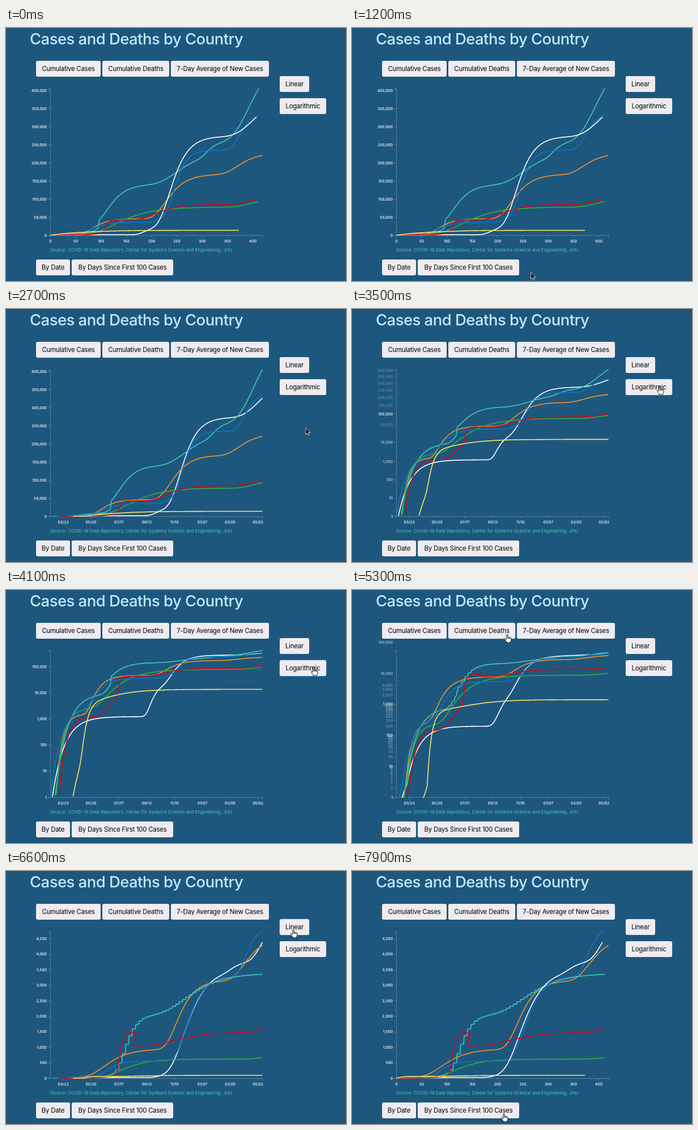
An HTML page that plays this animation: 600x447 px, repeating every 8000 ms.

```html
<!DOCTYPE html>
<html lang="en">
<head>
<meta charset="utf-8">
<title>Cases and Deaths by Country</title>
<style>
html, body { margin: 0; width: 100%; height: 100%; overflow: hidden; background: #1e577d; }
body { position: relative; font-family: Inter, Roboto, sans-serif; }
h1 { position: absolute; left: 42px; top: 2px; margin: 0; font-size: 27.5px; line-height: 34px;
  font-weight: 500; letter-spacing: -.02em; color: #c1e8ff; white-space: nowrap; }
.btn { position: absolute; height: 28px; border-radius: 3px; background: #eeecf0; color: #000;
  font-size: 11.4px; line-height: 28px; letter-spacing: -.02em; text-align: center; white-space: nowrap; }
.btn.on { box-shadow: 0 0 1.5px 1px #2f7fd0b0; }
svg { position: absolute; left: 0; top: 0; }
svg text { font-size: 6.6px; font-weight: 500; fill: #fff; }
#source { font-size: 7.91px; font-weight: 400; fill: #40c9b8; }
#lines path { fill: none; stroke-width: 1.6; stroke-linejoin: round; }
.axis { fill: none; stroke: #fff; stroke-opacity: .4; stroke-width: .6; }
#hand { fill: #fff; stroke: #000; stroke-width: .9; stroke-linejoin: round; }
#arrow { fill: #000; stroke: #fff; stroke-width: .8; }
</style>
</head>
<body>
<h1>Cases and Deaths by Country</h1>
<div id="buttons"></div>
<svg width="600" height="447" viewBox="0 0 600 447">
  <clipPath id="plot"><rect x="78" y="90" width="376" height="277"/></clipPath>
  <path class="axis" d="M74.5 107.5H78.5V366.5H74.5M78.5 366.5H452.5V370.5"/>
  <g id="yAxis" text-anchor="end"></g>
  <g id="xAxis" text-anchor="middle"></g>
  <g id="lines" clip-path="url(#plot)"></g>
  <text id="source" x="78" y="395">Source: COVID-19 Data Repository, Center for Systems Science and Engineering, JHU</text>
  <g id="cursor">
    <path id="arrow" d="M0 0V11.5L2.7 9L4.6 13.2L6.4 12.4L4.6 8.3H8.3Z"/>
    <path id="hand" d="M-1.1 .8Q-1-.3 0-.3T1.1 .8V4.6Q2.2 3.9 3.1 4.9Q4.3 4.4 5 5.4Q6.8 5 6.9 6.8V9.5Q6.5 11.5 5.6 12.5V14H-1V12.8Q-2.6 11-4.4 8.2Q-5 6.7-3.6 6.6Q-2.4 7-1.1 8.4ZM1.1 4.6V7M3.1 5V7.2M5 5.5V7.4"/>
  </g>
</svg>
<script>
const LOOP = 8000, EASE_MS = 400;
const LEFT = 78.5, RIGHT = 452.5, BASE = 366;
const DAYS = 442, DAY = 0.846, DAY_SINCE = 0.8925;
const $ = id => document.getElementById(id);
const mix = (a, b, p) => a + (b - a) * p;
const range = (n, f) => Array.from({ length: n }, (_, i) => f(i));

// Pixels per decade, units per pixel, and tick marks of each measure.
const SCALE = {
  cases: { decade: 46.2, unit: 1562.5, step: 50000, ticks: 9, powers: 6 },
  deaths: { decade: 70.5, unit: 18.25, step: 500, ticks: 10, powers: 4 }
};

// Each total is a sum of Gompertz waves: size, x of fastest growth, spread.
const COUNTRIES = {
  white: {
    rgb: [255, 255, 255], end: 442,
    cases: [[1200, 123, 21], [25000, 266, 13], [247000, 307, 18], [125000, 448, 30]],
    deaths: [[22, 130, 20], [90, 268, 10], [3400, 313, 24], [300, 398, 14], [1550, 452, 18]]
  },
  orange: {
    rgb: [240, 147, 43], end: 452.5,
    cases: [[1500, 108, 10], [44000, 167, 16], [123000, 290, 20], [59000, 410, 21]],
    deaths: [[30, 112, 10], [912, 172, 26], [2210, 300, 19], [1420, 420, 22]]
  },
  teal: {
    rgb: [64, 201, 184], end: 446, weeklyDeaths: [172, 368],
    cases: [[9500, 131, 20], [20000, 185, .2], [111000, 199, 18], [94000, 316, 31], [31000, 365, 10], [250000, 437, 28]],
    deaths: [[40, 125, 18], [150, 180, 10], [1860, 207, 13], [1330, 312, 38]]
  },
  green: {
    rgb: [47, 177, 53], end: 445,
    cases: [[2500, 113, 12], [75000, 213, 35], [28000, 440, 25]],
    deaths: [[13, 118, 12], [600, 201, 27], [70, 440, 15]]
  },
  blue: {
    rgb: [13, 116, 201], end: 446,
    cases: [[3000, 116, 18], [33000, 169, 18], [19000, 284, 9], [180000, 310, 12.5], [109000, 420, 14.5]],
    deaths: [[40, 120, 18], [510, 176, 15], [2760, 317, 19], [1610, 422, 13.6]]
  },
  red: {
    rgb: [217, 0, 27], end: 443,
    cases: [[1300, 117, 12], [8000, 186, 12], [33000, 199.5, 2.5], [42000, 281, 22], [28000, 442, 28]],
    deaths: [[12, 119, 11], [60, 175, 14], [1405, 199.5, 4], [-440, 227.5, .1], [440, 293, 34], [330, 448, 16]]
  },
  yellow: {
    rgb: [255, 228, 105], end: 411,
    cases: [[5000, 149, 9], [8300, 195, 35]],
    deaths: [[55, 142, 5], [37, 235, 35]]
  }
};

// Line order differs between the two x axes, so lines swap owners when the axis changes.
const ORDER = {
  date: ["white", "orange", "teal", "green", "blue", "red", "yellow"],
  days: ["orange", "teal", "green", "blue", "white", "red", "yellow"]
};

const view = (metric, log, x) => ({ metric, log, x });
const START = view("cases", false, "days");
const STEPS = [
  { at: 1760, to: view("cases", false, "date") },
  { at: 3270, to: view("cases", true, "date"), button: 4 },
  { at: 5123, to: view("deaths", true, "date"), button: 1 },
  { at: 6130, to: view("deaths", false, "date"), button: 3 },
  { at: 7350, to: view("deaths", false, "days") }
];

const BUTTONS = [
  ["Cumulative Cases", 53, 58, 114], ["Cumulative Deaths", 170, 58, 118],
  ["7-Day Average of New Cases", 291, 58, 173], ["Linear", 483, 85, 52],
  ["Logarithmic", 483, 124, 82], ["By Date", 53, 409, 60],
  ["By Days Since First 100 Cases", 116, 409, 179]
];

// Pointer stops: arrival, departure, x, y.
const STOPS = [
  [200, 200, 560, 460], [950, 950, 425, 436], [1600, 2120, 96, 424], [2620, 2850, 529, 210],
  [3200, 4350, 543, 137], [4950, 5500, 274, 79], [6050, 6850, 507, 104], [7300, LOOP, 268, 429]
];

const total = (waves, x) =>
  waves.reduce((sum, [size, mid, spread]) => sum + size * Math.exp(-Math.exp((mid - x) / spread)), 0);

const yOf = (v, n) => v.log
  ? BASE - Math.log10(Math.max(n, .1)) * SCALE[v.metric].decade
  : BASE - n / SCALE[v.metric].unit;

// One point per day, from the day of the first case.
function project(v, name) {
  const c = COUNTRIES[name], [from, to] = v.metric === "deaths" && c.weeklyDeaths || [RIGHT, RIGHT];
  const pts = range(DAYS + 1, i => RIGHT - (DAYS - i) * DAY)
    .filter(x => total(c.cases, x) >= 1)
    .map((x, i) => {
      const held = x > from && x < to ? i % 7 : 0;
      return [x, yOf(v, total(c[v.metric], x - held * DAY))];
    });
  if (v.x === "date") return pts;
  return pts.map(([x, y]) => [c.end - (RIGHT - x) * DAY_SINCE / DAY, y]).filter(p => p[0] >= LEFT);
}

function tickValues(v) {
  const s = SCALE[v.metric];
  if (!v.log) return range(s.ticks, i => i * s.step);
  if (v.metric === "cases") return range(s.powers, i => 10 ** i);
  return range(s.powers, e => range(9, i => (i + 1) * 10 ** e)).flat().filter(n => n <= 4000);
}

for (const v of [START, ...STEPS.map(s => s.to)]) {
  v.lines = ORDER[v.x].map(name => ({ pts: project(v, name), rgb: COUNTRIES[name].rgb }));
  v.ticks = tickValues(v);
}

const buttons = BUTTONS.map(([label, x, y, w]) => {
  const el = document.createElement("div");
  el.className = "btn";
  el.textContent = label;
  el.style.cssText = `left:${x}px;top:${y}px;width:${w}px`;
  return $("buttons").appendChild(el);
});
const paths = ORDER.date.map(() =>
  $("lines").appendChild(document.createElementNS("http://www.w3.org/2000/svg", "path")));

function drawLines(a, b, p) {
  b.lines.forEach((line, k) => {
    const from = a.lines[k];
    const d = line.pts.map(([x, y], i) => {
      const [x0, y0] = from.pts[i] || [x, y];
      return mix(x0, x, p).toFixed(1) + " " + mix(y0, y, p).toFixed(1);
    });
    paths[k].setAttribute("d", "M" + d.join("L"));
    paths[k].setAttribute("stroke", `rgb(${line.rgb.map((c, i) => Math.round(mix(from.rgb[i], c, p)))})`);
  });
}

function drawAxes(a, b, p) {
  const tickY = (v, n) => yOf(v, v.log ? Math.max(n, 1) : n);
  $("yAxis").innerHTML = [...new Set([...a.ticks, ...b.ticks])].map(n => {
    const y = mix(tickY(a, n), tickY(b, n), p);
    const alpha = mix(+a.ticks.includes(n), +b.ticks.includes(n), p);
    return alpha < .01 ? "" : `<g opacity="${alpha}"><path class="axis" d="M74.5 ${y + .5}H78.5"/>`
      + `<text x="72" y="${y + 2.6}">${n.toLocaleString("en-US")}</text></g>`;
  }).join("");
  const label = (x, s) => `<path class="axis" d="M${x} 366.5V370"/><text x="${x}" y="378.5">${s}</text>`;
  const dates = ["03/23", "05/20", "07/17", "09/13", "11/10", "01/07", "03/05", "05/02"];
  $("xAxis").innerHTML = a.x !== b.x && p < 1 ? ""
    : b.x === "date" ? dates.map((s, i) => label(101 + i * 49.1, s)).join("")
    : range(9, i => label(LEFT + i * 50 * DAY_SINCE, i * 50)).join("");
}

function drawPointer(t, clicked) {
  const i = STOPS.findLastIndex(s => t >= s[0]);
  $("cursor").style.display = i < 0 ? "none" : "";
  const [, leave, x0, y0] = STOPS[Math.max(i, 0)], [arrive, , x1, y1] = STOPS[i + 1] || STOPS[i];
  const u = t > leave ? (t - leave) / (arrive - leave) : 0, e = u * u * (3 - 2 * u);
  const x = mix(x0, x1, e), y = mix(y0, y1, e);
  const over = BUTTONS.findIndex(([, bx, by, w]) => x > bx && x < bx + w && y > by && y < by + 28);
  $("cursor").setAttribute("transform", `translate(${x} ${y})`);
  $("hand").style.display = over < 0 ? "none" : "";
  $("arrow").style.display = over < 0 ? "" : "none";
  buttons.forEach((el, k) => el.classList.toggle("on", k === over && k === clicked));
}

let drawn = "";
function frame(now) {
  const t = now % LOOP;
  const k = STEPS.findLastIndex(s => s.at <= t);
  const b = k < 0 ? START : STEPS[k].to;
  const a = k < 1 ? START : STEPS[k - 1].to;
  const u = k < 0 ? 1 : Math.min(1, (t - STEPS[k].at) / EASE_MS);
  const p = u < .5 ? 4 * u ** 3 : 1 - 4 * (1 - u) ** 3;
  const key = k + ":" + p;
  if (key !== drawn) {
    drawLines(a, b, p);
    drawAxes(a, b, p);
    drawn = key;
  }
  drawPointer(t, STEPS[k]?.button);
  requestAnimationFrame(frame);
}
requestAnimationFrame(frame);
</script>
</body>
</html>
```
